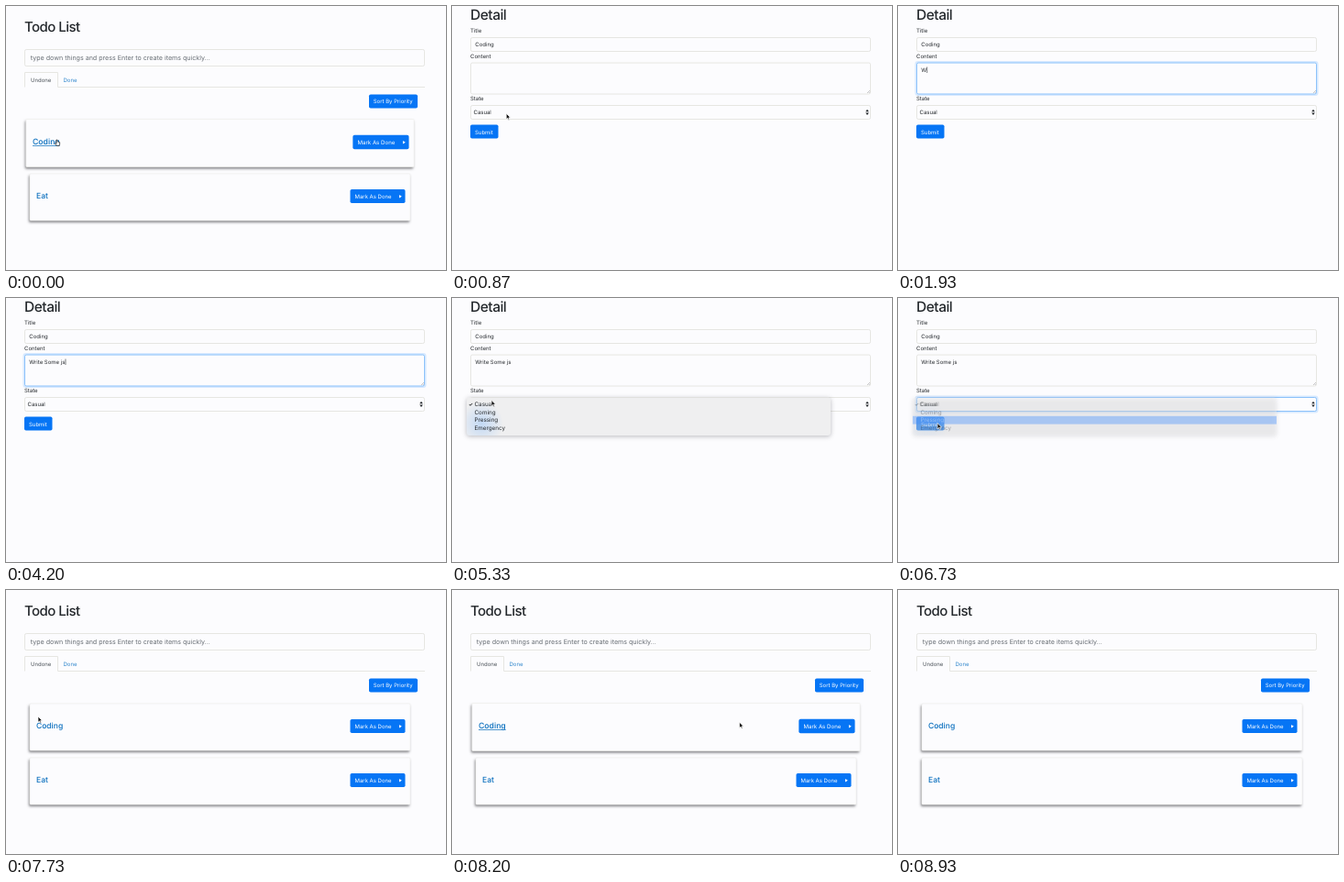
An HTML page with a canvas for the animation above (8990 ms loop, 480 by 288 pixels).

```html
<!DOCTYPE html>
<html lang="en">
<head>
<meta charset="utf-8">
<title>Todo List</title>
<style>
  html, body { margin: 0; width: 100%; height: 100%; overflow: hidden; background: #fcfcfe; }
  canvas { display: block; width: 480px; height: 288px; }
</style>
</head>
<body>
<canvas id="stage"></canvas>
<script>
const LOOP = 8990;
const PAGE = '#fcfcfe', INK = '#24282c', LINE = '#e6e6e2', BLUE = '#0675f5', LINK = '#0a6fbe', FOCUS = '#8cc2fa';
const FONT = 'Inter, "Open Sans", sans-serif';
const OPTIONS = ['Casual', 'Coming', 'Pressing', 'Emergency'];
const NOTE = 'Write Some js';

// Moments of the story, in ms
const OPEN_DETAIL = 480, FOCUS_NOTE = 1400, TYPE_START = 1880, TYPE_STEP = 175, TYPE_END = 4730,
      BLUR_NOTE = 5130, OPEN_MENU = 5270, CLOSE_MENU = 6600, MENU_FADE = 210, PICK = 6800, BACK_TO_LIST = 7530;

// Pointer path: time, x, y
const PATH = [
  [0, 55, 146], [480, 55, 146], [1000, 60, 112], [1350, 70, 80], [1880, 70, 80],
  [4730, 70, 80], [5150, 43, 111.5], [5670, 43, 111.5], [6050, 43, 128], [6350, 43, 136.5],
  [6900, 43, 136.5], [7250, 35, 138], [7730, 35, 138], [8080, 250, 148], [8400, 448, 136],
  [8600, 432, 205], [8880, 464, 292], [8990, 464, 292]
];

const canvas = document.getElementById('stage');
const g = canvas.getContext('2d');
const dpr = window.devicePixelRatio || 1;
canvas.width = 480 * dpr;
canvas.height = 288 * dpr;
g.textRendering = 'geometricPrecision';

const ramp = (t, from, to) => Math.max(0, Math.min(1, (t - from) / (to - from)));
const ease = p => p * p * (3 - 2 * p);

function text(str, x, y, { size = 6, color = INK, weight = 400, tracking = 0 } = {}) {
  g.font = `${weight} ${size}px ${FONT}`;
  g.letterSpacing = tracking + 'px';
  g.fillStyle = color;
  g.fillText(str, x, y);
  return g.measureText(str).width;
}

function box(x, y, w, h, { fill, stroke, radius = 1.8, lineWidth = 1 } = {}) {
  g.beginPath();
  g.roundRect(x, y, w, h, radius);
  if (fill) { g.fillStyle = fill; g.fill(); }
  if (stroke) { g.strokeStyle = stroke; g.lineWidth = lineWidth; g.stroke(); }
}

function shape(color, ...points) {
  g.beginPath();
  for (const [x, y] of points) g.lineTo(x, y);
  g.closePath();
  g.fillStyle = color;
  g.fill();
}

function shadow(color, blur, dx, dy) {
  g.shadowColor = color;
  g.shadowBlur = blur * dpr;
  g.shadowOffsetX = dx * dpr;
  g.shadowOffsetY = dy * dpr;
}

function field(y, h, focused) {
  if (focused) box(20, y, 437, h, { stroke: 'rgba(128,189,255,.3)', lineWidth: 3 });
  box(20.5, y + .5, 436, h - 1, { fill: PAGE, stroke: focused ? FOCUS : LINE });
}

function card(title, y, hover) {
  g.save();
  const scale = 1 + .02 * hover, middle = y + 25.5;
  g.translate(233.5, middle);
  g.scale(scale, scale);
  g.translate(-233.5, -middle);

  g.save();
  shadow('rgba(45,45,50,.6)', 3, -1, 2);
  box(26, y, 415, 51, { fill: PAGE, radius: 1 });
  g.restore();
  box(26, y, 415, 51, { stroke: '#eeeeec', radius: 1, lineWidth: .7 });

  const width = text(title, 33, y + 27, { size: 8.5, color: LINK, weight: 500 });
  if (hover > .9) { g.fillStyle = LINK; g.fillRect(33, y + 28, width, .7); }

  box(375.5, y + 17, 60, 15, { fill: BLUE });
  text('Mark As Done', 380.5, y + 26.7, { color: '#fff' });
  shape('#fff', [429, y + 23], [431.8, y + 24.7], [429, y + 26.4]);
  g.restore();
}

function listPage(t) {
  text('Todo List', 20, 27.5, { size: 15, weight: 500, tracking: -.55 });
  box(20.5, 47.5, 436, 18, { stroke: LINE });
  text('type down things and press Enter to create items quickly...', 26.8, 59.3, { size: 7.1, color: '#666c72' });

  g.beginPath();
  g.moveTo(20.5, 88.5);
  g.lineTo(20.5, 72.5);
  g.lineTo(56.5, 72.5);
  g.lineTo(56.5, 88.5);
  g.lineTo(457, 88.5);
  g.strokeStyle = LINE;
  g.lineWidth = 1;
  g.stroke();
  text('Undone', 27, 82.5, { color: '#495057' });
  text('Done', 62.5, 82.5, { color: '#2f86cc' });

  box(396, 96.5, 53, 15, { fill: BLUE });
  text('Sort By Priority', 400.7, 106.3, { color: '#fff' });

  const codingHover = t < OPEN_DETAIL ? 1 : ramp(t, 7800, 7980) - ramp(t, 8260, 8400);
  const eatHover = ramp(t, 8470, 8600) - ramp(t, 8700, 8860);
  card('Coding', 124, ease(codingHover));
  card('Eat', 183, ease(eatHover));
}

function menu(t) {
  g.save();
  g.globalAlpha = 1 - ramp(t, CLOSE_MENU, CLOSE_MENU + MENU_FADE);
  g.save();
  shadow('rgba(60,60,70,.35)', 5, 0, 1);
  box(16, 108.5, 397, 41.5, { fill: '#efeff0', radius: 3 });
  g.restore();

  // The submit button glimmers through the frosted menu
  const glow = g.createRadialGradient(32, 137, 0, 32, 137, 24);
  glow.addColorStop(0, 'rgba(90,165,255,.3)');
  glow.addColorStop(1, 'rgba(90,165,255,0)');
  box(16, 108.5, 397, 41.5, { fill: glow, radius: 3 });

  const y = pointerAt(t)[1];
  const active = t > 5400 ? Math.floor((y - 111.2) / 8.8) : -1;
  OPTIONS.forEach((name, i) => {
    const top = 111.2 + i * 8.8, color = i === active ? '#fff' : INK;
    if (i === active) { g.fillStyle = '#3b8bff'; g.fillRect(16, top, 397, 8.8); }
    text(name, 24.5, top + 6.6, { size: 6.3, color });
    if (i === 0) text('✓', 18, top + 6.6, { size: 5.5, color, weight: 700 });
  });
  g.restore();
}

function detailPage(t) {
  text('Detail', 20, 15, { size: 15.5, weight: 500, tracking: -.5 });

  text('Title', 20, 28.7);
  field(34, 16);
  text('Coding', 25.3, 44.2);

  text('Content', 20, 56.5);
  const writing = t >= FOCUS_NOTE && t < BLUR_NOTE;
  field(61.5, 35, writing);
  const typed = t < TYPE_START ? 0 : Math.floor((t - TYPE_START) / TYPE_STEP) + 1;
  const width = text(NOTE.slice(0, typed), 25.3, 71.7);
  if (writing) { g.fillStyle = INK; g.fillRect(25.6 + width, 66.5, .6, 6.5); }
  g.beginPath();
  g.moveTo(453, 95);
  g.lineTo(456, 92);
  g.moveTo(454.8, 95);
  g.lineTo(456, 93.8);
  g.strokeStyle = '#a2a2a4';
  g.lineWidth = .6;
  g.stroke();

  text('State', 20, 103);
  field(108, 16, t >= CLOSE_MENU);
  text(OPTIONS[t < PICK ? 0 : 2], 23.5, 118);
  shape(INK, [451.2, 115.2], [453, 112.7], [454.8, 115.2]);
  shape(INK, [451.2, 116.4], [453, 118.9], [454.8, 116.4]);

  box(20, 129.5, 30.5, 15, { fill: BLUE });
  text('Submit', 25, 139.5, { color: '#fff' });

  if (t >= OPEN_MENU && t < CLOSE_MENU + MENU_FADE) menu(t);
}

function pointerAt(t) {
  const next = Math.max(1, PATH.findIndex(p => p[0] > t));
  const [t0, x0, y0] = PATH[next - 1], [t1, x1, y1] = PATH[next];
  const p = ease(ramp(t, t0, t1));
  return [x0 + (x1 - x0) * p, y0 + (y1 - y0) * p];
}

function pointer(t) {
  if (t >= TYPE_START && t < TYPE_END) return;
  g.save();
  g.translate(...pointerAt(t));
  g.lineWidth = .7;
  if (t < OPEN_DETAIL) {
    shape('#fff', [0, 0], [1, 0], [1.2, 2], [3.6, 2.6], [3.6, 5], [3, 6.5], [.4, 6.5], [-1.5, 3.8], [0, 4]);
    g.strokeStyle = '#222';
  } else {
    shape('#111', [0, 0], [0, 6.3], [1.5, 5], [2.5, 7.2], [3.5, 6.7], [2.6, 4.6], [4.5, 4.5]);
    g.strokeStyle = '#fff';
  }
  g.stroke();
  g.restore();
}

const start = performance.now();

function frame() {
  const t = (performance.now() - start) % LOOP;
  g.setTransform(dpr, 0, 0, dpr, 0, 0);
  g.fillStyle = PAGE;
  g.fillRect(0, 0, 480, 288);
  if (t >= OPEN_DETAIL && t < BACK_TO_LIST) detailPage(t);
  else listPage(t);
  pointer(t);
  requestAnimationFrame(frame);
}
frame();
</script>
</body>
</html>
```
